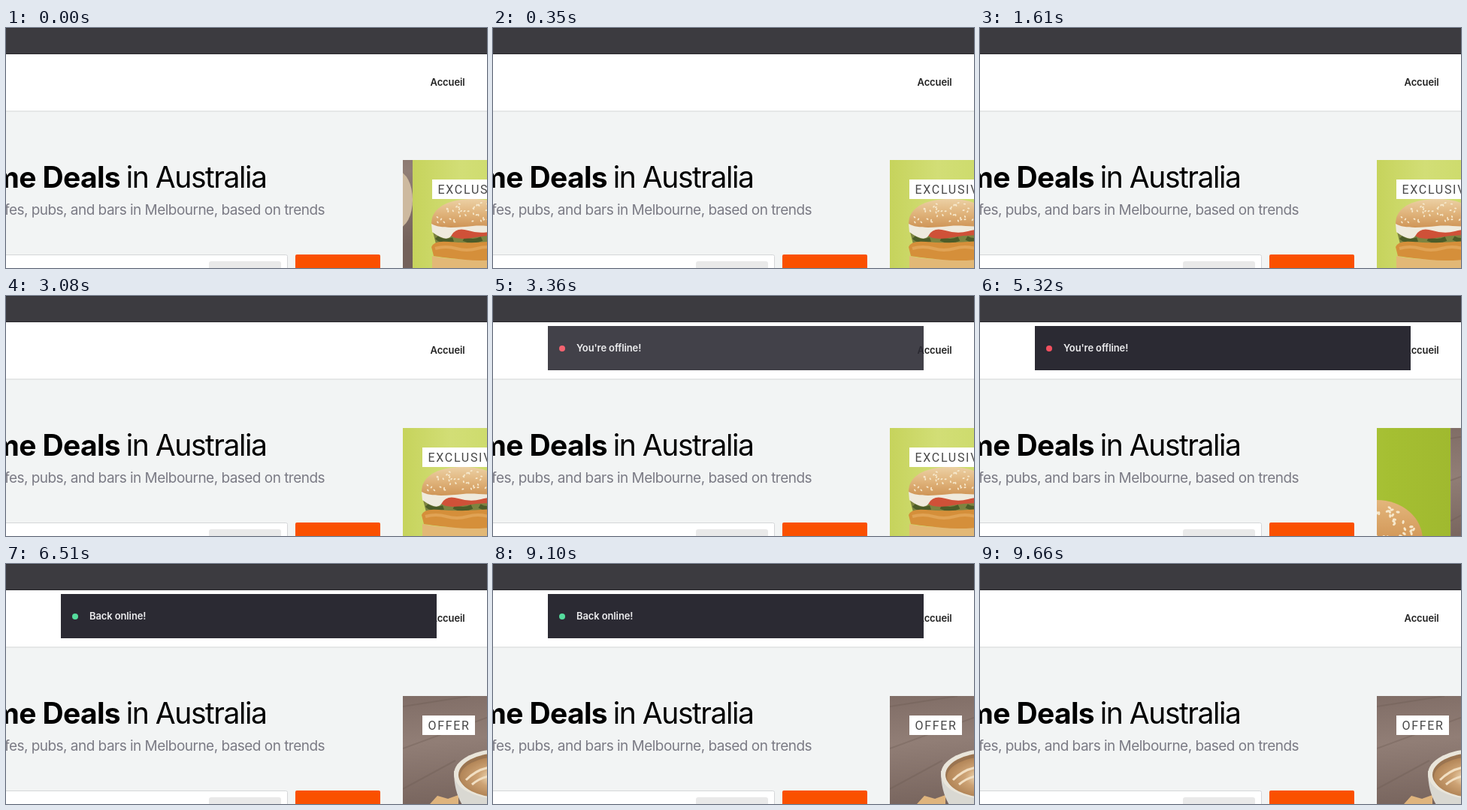
Write an HTML page that moves like this. It is 640 px wide and 320 px high and loops after 9800 ms.

```html
<!DOCTYPE html>
<html lang="en">
<head>
<meta charset="utf-8">
<title>Connection toast</title>
<style>
  html, body { margin: 0; width: 100%; height: 100%; overflow: hidden; background: #f2f4f4; }
  svg { display: block; width: 100%; height: 100%; }
  text { font-family: Inter, Roboto, sans-serif; }
  .end { text-anchor: end; }
  .title { font-size: 39px; }
  .small { font-size: 13px; font-weight: 600; letter-spacing: -.12px; }
  .tag { font: 400 16px Roboto, sans-serif; letter-spacing: 1.7px; fill: #484848; }
</style>
</head>
<body>
<svg viewBox="0 0 640 320">
  <defs>
    <clipPath id="frame"><rect x="528" y="176" width="112" height="144"/></clipPath>
    <linearGradient id="lime">
      <stop offset="0" stop-color="#c6d35c"/><stop offset=".12" stop-color="#d2de76"/>
      <stop offset=".3" stop-color="#c9d964"/><stop offset=".85" stop-color="#a5bf32"/><stop offset="1" stop-color="#a0b92f"/>
    </linearGradient>
    <linearGradient id="wood" x2=".35" y2="1">
      <stop offset="0" stop-color="#806d66"/><stop offset=".4" stop-color="#917e76"/><stop offset="1" stop-color="#74615a"/>
    </linearGradient>
    <linearGradient id="bun" x2="0" y2="1">
      <stop offset="0" stop-color="#ecd0a4"/><stop offset=".5" stop-color="#e0b47c"/><stop offset="1" stop-color="#cf9557"/>
    </linearGradient>
    <linearGradient id="toasted" x2="0" y2="1">
      <stop offset="0" stop-color="#e3b67c"/><stop offset=".6" stop-color="#cf9150"/><stop offset="1" stop-color="#b9773a"/>
    </linearGradient>
    <radialGradient id="foam">
      <stop offset="0" stop-color="#f3e4cb"/><stop offset=".3" stop-color="#e6cba5"/>
      <stop offset=".55" stop-color="#cda375"/><stop offset="1" stop-color="#b28557"/>
    </radialGradient>
  </defs>

  <rect width="640" height="320" fill="#f2f4f4"/>
  <rect y="110" width="640" height="2" fill="#e5e7e7"/>
  <rect y="35" width="640" height="75" fill="#fff"/>
  <rect width="640" height="35" fill="#3c3b40"/>
  <path d="M0 .5H640" stroke="#333236"/>
  <path d="M0 34.5H640" stroke="#29282c"/>
  <text class="small" x="564.5" y="77" fill="#222">Accueil</text>

  <text class="title end" x="152" y="213" font-weight="700" letter-spacing="-.65">me Deals</text>
  <text class="title end" x="346.5" y="213" letter-spacing="-1.45">in Australia</text>
  <text class="end" x="424" y="249" font-size="19" letter-spacing="-.53" fill="#7b7b85">cafes, pubs, and bars in Melbourne, based on trends</text>

  <rect x="-5" y="302.5" width="379.5" height="40" rx="2" fill="#fff" stroke="#d4d6d8"/>
  <rect x="270" y="311" width="96" height="30" rx="3" fill="#e9e9e9"/>
  <rect x="385" y="302" width="113" height="40" rx="2" fill="#fa5000"/>

  <g clip-path="url(#frame)">
    <g id="burger">
      <rect y="176" width="535" height="144" fill="url(#lime)"/>
      <path d="M26 304C50 310 110 310 140 304V330H26Z" fill="#e2b876"/>
      <path d="M27 272H138V292H32Z" fill="#7d8440"/>
      <path d="M32 279q8 8 22 3M68 281q12 6 24 0M102 280q10 6 20 0" fill="none" stroke="#4c5c28" stroke-width="6"/>
      <path d="M25 292Q28 283 48 285T84 286T138 283V306Q100 312 70 309T28 304Z" fill="#d58f3a"/>
      <path d="M30 294q14-4 28 0t28 0t28 0t24 0" fill="none" stroke="#e0a355" stroke-width="4"/>
      <path d="M48 268Q90 262 138 267V278Q110 274 84 279T50 276Z" fill="#cf5138"/>
      <path d="M25 261H138V269Q118 267 104 271T74 270T52 276T26 272Z" fill="#efeadd"/>
      <path d="M25 261C25 239 48 228 80 228S136 240 136 262C120 268 100 262 80 264S36 268 25 261Z" fill="url(#bun)"/>
      <ellipse cx="437" cy="325" rx="61" ry="53" fill="url(#toasted)"/>
      <g id="seeds" fill="#f6e8cc"></g>
      <rect x="26" y="202" width="120" height="26" fill="#fff"/>
      <text class="tag" x="33.5" y="221">EXCLUSIVE</text>
    </g>
    <g id="coffee">
      <rect y="176" width="535" height="144" fill="url(#wood)"/>
      <path d="M0 190L90 176M0 246L190 176M0 300L70 262" stroke="#6b5952" stroke-opacity=".35" stroke-width="2"/>
      <ellipse cx="515" cy="229" rx="20" ry="38" fill="#cdb99f"/>
      <path d="M36 320L46 309L60 313L74 308V320Z" fill="#dfb47d"/>
      <path d="M68 276C68 298 73 312 82 326H190V276Z" fill="#d9d8d2"/>
      <ellipse cx="128" cy="280" rx="60" ry="33" fill="#e9e5da"/>
      <ellipse cx="129" cy="281" rx="55" ry="29" fill="#9a7450"/>
      <ellipse cx="129" cy="284" rx="53" ry="27" fill="url(#foam)"/>
      <path d="M84 288q20-20 46-17M92 294q16-14 40-12" fill="none" stroke="#f1dfc3" stroke-width="3"/>
      <rect x="26" y="202" width="70" height="26" fill="#fff"/>
      <text class="tag" x="33.5" y="221">OFFER</text>
    </g>
  </g>

  <g id="toast">
    <rect x="73" y="40" width="500" height="59" fill="#2b2a33"/>
    <circle id="dot" cx="92" cy="70" r="4"/>
    <text id="message" class="small" x="111" y="74" fill="#ececee"></text>
  </g>
</svg>
<script>
const LOOP = 9800, STEP = 70, WIDTH = 535, SLIDE_MS = 1020;
const $ = id => document.getElementById(id);
const clamp = v => Math.min(1, Math.max(0, v));

// cubic-bezier(.25, .1, .25, 1)
function ease(p) {
  p = clamp(p);
  let lo = 0, hi = 1;
  for (let i = 0; i < 24; i++) {
    const s = (lo + hi) / 2;
    if (.75 * s * (1 - s) + s ** 3 < p) lo = s; else hi = s;
  }
  const d = 1 - lo;
  return 1 - d ** 3 - 2.7 * lo * d * d;
}

let seed = 7;
const random = () => (seed = seed * 16807 % 2147483647) / 2147483647;

function sprinkle(cx, cy, rx, ry, count, size) {
  for (let i = 0; i < count; i++) {
    const a = Math.PI * (1 + random()), r = Math.sqrt(random()) * .9;
    const x = cx + rx * r * Math.cos(a), y = cy + ry * r * Math.sin(a);
    $("seeds").insertAdjacentHTML("beforeend",
      `<ellipse rx="${size}" ry="${size * .6}" transform="translate(${x} ${y}) rotate(${random() * 180})"/>`);
  }
}
sprinkle(80, 259, 54, 31, 45, 1.6);
sprinkle(437, 322, 59, 48, 50, 2.6);

const place = (id, x) => $(id).setAttribute("transform", `translate(${528 + x} 0)`);

function draw(t) {
  const enter = ease((t + 816) / SLIDE_MS), leave = ease((t - 4795) / SLIDE_MS);
  place("burger", WIDTH * (1 - enter - leave));
  place("coffee", t < 4795 ? -WIDTH * enter : WIDTH * (1 - leave));

  const shown = t < 3150 ? 0 : 1 - Math.exp((3150 - t) / 95);
  $("toast").setAttribute("opacity", shown * clamp((9660 - t) / 350));
  const online = t >= 6230;
  $("dot").setAttribute("fill", online ? "#55dc9d" : "#f2505f");
  $("message").textContent = online ? "Back online!" : "You're offline!";
}

const start = performance.now();
function tick() {
  const t = (performance.now() - start) % LOOP;
  draw(Math.floor(t / STEP) * STEP);
  requestAnimationFrame(tick);
}
tick();
</script>
</body>
</html>
```
